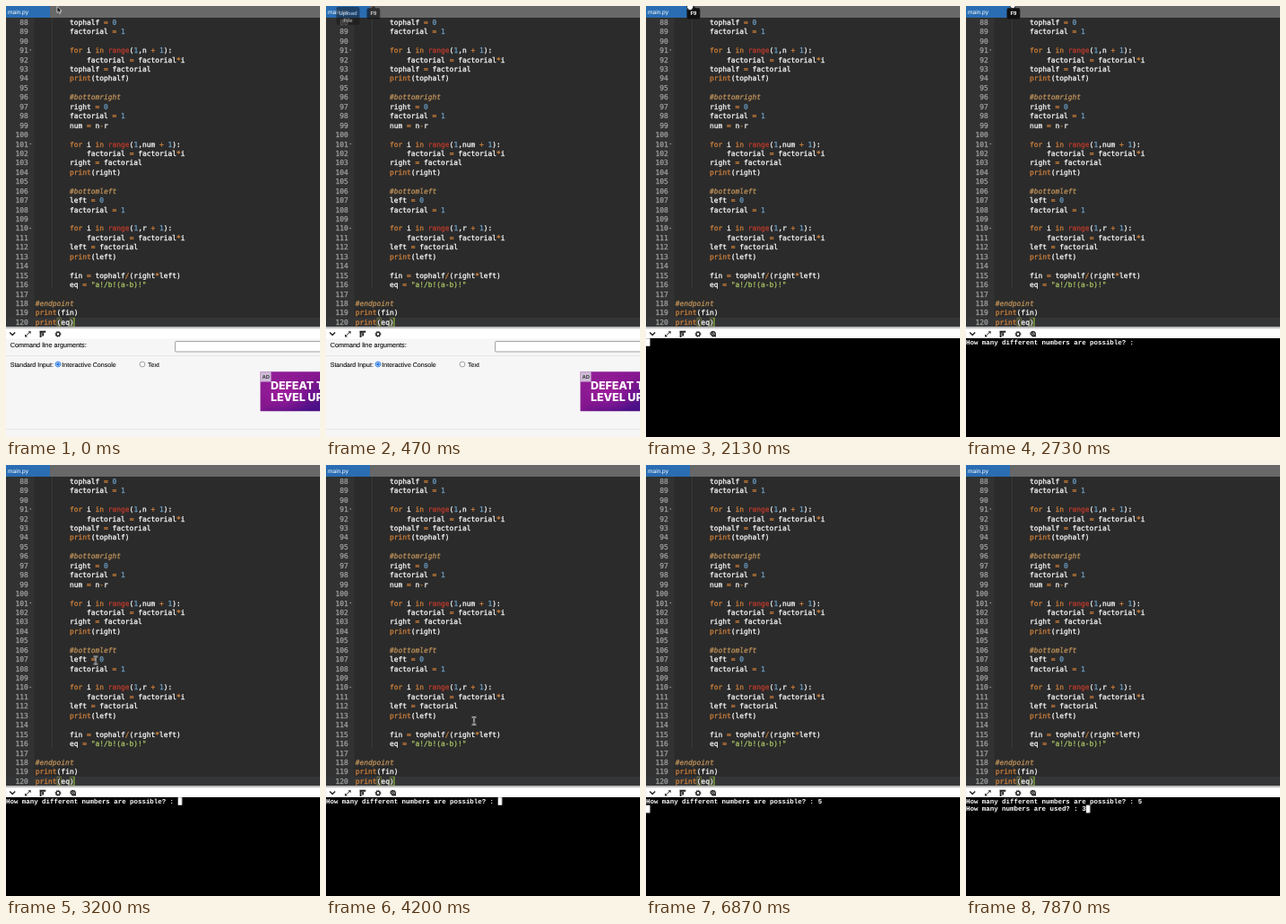
An HTML page that plays this animation: 350 by 480 pixels, repeating every 8000 ms.

```html
<!DOCTYPE html>
<html lang="en">
<head>
<meta charset="utf-8">
<title>Editor and console</title>
<style>
html, body { margin: 0; width: 100%; height: 100%; overflow: hidden; background: #2b2b2b; }
svg { display: block; width: 350px; height: 480px; text-rendering: geometricPrecision; }
.code { font: 7.92px "DejaVu Sans Mono", monospace; color: #fff; }
.code text, .code tspan { fill: currentColor; stroke: currentColor; stroke-width: .25; }
.num { color: #a2a2a2; text-anchor: end; }
.key { color: #d0803a; }
.fn { color: #bd3a2b; }
.val { color: #6c9fc6; }
.str { color: #a9c565; }
.rem { color: #c0935a; font-style: italic; }
.ui { font: 7.05px "Liberation Sans", Arial, sans-serif; }
.label { fill: #111; stroke: #111; stroke-width: .12; }
.term { font: bold 7.43px "Liberation Mono", monospace; fill: #fff; white-space: pre; }
.tip { font: bold 6px "Liberation Sans", Arial, sans-serif; fill: #fff; text-anchor: middle; }

/* one 8 s loop: 1% = 80 ms */
.a { animation: 8s linear infinite; }
.s { animation: 8s step-end infinite; }
#glow { animation-name: glow; }
#arrow { animation-name: arrow; }
#hand { animation-name: hand; }
#beam { animation-name: beam; }
#tipOpen { animation-name: tipOpen; }
#tipRun { animation-name: tipRun; }
.run { animation-name: run; }
#ask1 { animation-name: ask1; }
#ans1 { animation-name: ans1; }
#ask2 { animation-name: ask2; }
#ans2 { animation-name: ans2; }
#caret { animation-name: caret; }
#blink { animation-name: blink; }

@keyframes glow {
  0% { transform: translate(0, 0); }
  18.375%, 100% { transform: translate(16px, -4px); }
}
@keyframes arrow {
  0%, .8% { transform: translate(57px, .5px); opacity: 1; }
  2.6% { transform: translate(42px, -10px); opacity: 1; }
  2.61%, 100% { transform: translate(42px, -10px); opacity: 0; }
}
@keyframes tipOpen {
  0%, 2.5% { opacity: 0; }
  4.2%, 4.8% { opacity: .9; }
  7.2%, 100% { opacity: 0; }
}
@keyframes tipRun {
  0%, 4.2% { opacity: 0; }
  6.8%, 35.8% { opacity: 1; }
  37.8%, 100% { opacity: 0; }
}
@keyframes hand {
  0%, 26.62% { transform: translate(49px, 1px); opacity: 0; }
  26.625% { transform: translate(49px, 1px); opacity: 1; }
  33% { transform: translate(51px, -2px); opacity: 1; }
  36.6% { transform: translate(54px, 1px); opacity: 1; }
  36.61%, 100% { transform: translate(54px, 1px); opacity: 0; }
}
@keyframes beam {
  0%, 36.6% { transform: translate(56px, 8px); opacity: 0; }
  36.61% { transform: translate(56px, 8px); opacity: 1; }
  38% { transform: translate(68px, 85px); }
  40% { transform: translate(99.5px, 217px); }
  41.2% { transform: translate(137px, 264px); }
  42.5%, 45.8% { transform: translate(166.5px, 287px); }
  46.625%, 79.1% { transform: translate(165px, 285px); opacity: 1; }
  79.12%, 100% { transform: translate(165px, 285px); opacity: 0; }
}
@keyframes run { 0% { opacity: 0; } 26.625%, 100% { opacity: 1; } }
@keyframes ask1 { 0% { opacity: 0; } 33.375%, 100% { opacity: 1; } }
@keyframes ans1 { 0% { opacity: 0; } 77.5%, 100% { opacity: 1; } }
@keyframes ask2 { 0% { opacity: 0; } 86.625%, 100% { opacity: 1; } }
@keyframes ans2 { 0% { opacity: 0; } 98.375%, 100% { opacity: 1; } }
@keyframes caret {
  0% { transform: translate(0, 0); }
  33.375% { transform: translate(191.7px, 0); }
  77.5% { transform: translate(196.2px, 0); }
  85.875% { transform: translate(0, 8.6px); }
  86.625% { transform: translate(129.3px, 8.6px); }
  98.375%, 100% { transform: translate(133.8px, 8.6px); }
}
@keyframes blink {
  0% { opacity: 1; }
  30% { opacity: 0; }
  37.5% { opacity: 1; }
  45% { opacity: 0; }
  52.5% { opacity: 1; }
  60% { opacity: 0; }
  67.5% { opacity: 1; }
  75% { opacity: 0; }
  77.5% { opacity: 1; }
  93.375% { opacity: 0; }
  98.375%, 100% { opacity: 1; }
}
</style>
</head>
<body>
<svg viewBox="0 0 350 480">
  <defs>
    <linearGradient id="purple" x2=".8" y2="1">
      <stop offset="0" stop-color="#97209a"/>
      <stop offset=".55" stop-color="#84178f"/>
      <stop offset="1" stop-color="#4a1088"/>
    </linearGradient>
    <radialGradient id="shine">
      <stop offset="0" stop-color="#b823a8" stop-opacity=".5"/>
      <stop offset="1" stop-color="#b823a8" stop-opacity="0"/>
    </radialGradient>
    <clipPath id="banner"><path d="M283.500 407.300h67v44h-67z"/></clipPath>
  </defs>

  <!-- editor -->
  <rect width="350" height="358" fill="#2b2b2b"/>
  <rect y="12" width="31.500" height="346" fill="#323232"/>
  <rect y="347" width="350" height="10.500" fill="#343536"/>
  <path d="M51.500 13V315" stroke="#3d3d3d" stroke-width=".8"/>
  <g id="code" class="code"></g>
  <path d="M57 347.400h4.400v9.200h-4.400zM71.300 347.400h4.400v9.200h-4.400z" fill="none" stroke="#7c8a40" stroke-width=".7"/>
  <path d="M76 347v10" stroke="#8fd038" stroke-width=".9"/>
  <rect width="350" height="13" fill="#686868"/>
  <rect width="49" height="13" fill="#2a6db3"/>
  <text class="ui" x="2" y="8.600" fill="#fff" style="font-size:6.6px">main.py</text>

  <!-- panel -->
  <rect y="357.500" width="350" height="123" fill="#f6f6f6"/>
  <rect y="357.500" width="350" height="2" fill="#c8c8c8"/>
  <rect y="359.500" width="350" height="11" fill="#fff"/>
  <g fill="none" stroke="#222" stroke-width="1.400">
    <path d="M4.200 363.600l3 3 3-3"/>
    <path d="M21.800 367.800l5-5" stroke-width="1"/>
    <path d="M24.600 362.200h3v3zM21 365.400v3h3z" fill="#222" stroke="none"/>
    <path d="M37.500 362.700h6.800M38.600 362v7M41.200 364v3.400" stroke-width="1.900"/>
    <circle cx="58" cy="365.400" r="2"/>
    <circle cx="58" cy="365.400" r="3" stroke-width="1" stroke-dasharray="1.200 1.156"/>
  </g>
  <g class="s run" fill="#333">
    <path d="M71.600 363.200l2.400-1.400 3 .8 1 2.200v3.600l-4 .2-2.600-3z"/>
    <path d="M73 364.400l2 2M75 363.600l1.600 2.400" stroke="#fff" stroke-width=".7"/>
  </g>

  <g class="ui">
    <path d="M0 389.500h350M0 471.500h350" stroke="#e6e6e6"/>
    <rect x="188.500" y="373.500" width="170" height="11.500" rx="1" fill="#fff" stroke="#8c8c8c" stroke-width=".8"/>
    <circle cx="58" cy="399" r="2.900" fill="#fff" stroke="#1b6fe0" stroke-width=".9"/>
    <circle cx="58" cy="399" r="1.800" fill="#1b6fe0"/>
    <circle cx="152" cy="399" r="2.900" fill="#fff" stroke="#777" stroke-width=".7"/>
    <g class="label">
      <text x="4.700" y="380.300" style="font-size:7.25px">Command line arguments:</text>
      <text x="4.700" y="401.600">Standard Input:</text>
      <text x="62.300" y="401.600">Interactive Console</text>
      <text x="158" y="401.600">Text</text>
    </g>
  </g>

  <!-- banner -->
  <g clip-path="url(#banner)">
    <rect x="283" y="407" width="67" height="45" fill="url(#purple)"/>
    <ellipse id="glow" class="a" cx="312" cy="432" rx="30" ry="22" fill="url(#shine)"/>
    <g font-family="Inter, Arial, sans-serif" font-weight="800" font-size="12.400" fill="#fff">
      <text x="295" y="427.200">DEFEAT THE</text>
      <text x="295" y="440.200">LEVEL UP</text>
    </g>
    <rect x="283.500" y="407.300" width="12" height="11.200" fill="#cdbad6"/>
    <text class="ui" x="285.600" y="415.400" fill="#333" style="font-size:5.8px;font-weight:bold">AD</text>
  </g>

  <!-- console -->
  <g class="s run">
    <rect y="370" width="350" height="110"/>
    <g class="term">
      <text id="ask1" class="s" x="0" y="376.600">How many different numbers are possible? :</text>
      <text id="ans1" class="s" x="191.700" y="376.600">5</text>
      <text id="ask2" class="s" x="0" y="385.200">How many numbers are used? :</text>
      <text id="ans2" class="s" x="129.300" y="385.200">3</text>
    </g>
    <g id="caret" class="s">
      <rect id="blink" class="s" y="370.200" width="4.500" height="8.600" fill="#fff"/>
    </g>
  </g>

  <!-- tooltips -->
  <g id="tipOpen" class="a tip" opacity="0">
    <rect x="11.500" y="1" width="26" height="20" rx="2" fill="#151515"/>
    <text x="24.500" y="9.600">Upload</text>
    <text x="24.500" y="18">File</text>
  </g>
  <g id="tipRun" class="a tip" opacity="0">
    <path d="M47.500 2.200h3.200L53 0l2.300 2.200h3a2 2 0 0 1 2 2v8.200a2 2 0 0 1-2 2H47.500a2 2 0 0 1-2-2V4.200a2 2 0 0 1 2-2z" fill="#111"/>
    <text x="52.900" y="10.400">F9</text>
  </g>

  <!-- pointers -->
  <path id="arrow" class="a" d="M0 0v7l1.600-1.500 1.100 2.500 1.300-.6-1.100-2.400h2.200z" fill="#000" stroke="#fff" stroke-width=".7"/>
  <path id="hand" class="a" d="M-3.500-3v3.200q1 3.600 3.600 3.600t3.600-3.600V-3z" fill="#fff" stroke="#111" stroke-width=".8"/>
  <g id="beam" class="a" fill="none">
    <path d="M-2.400-4.400q2.400 0 2.400 1.400 0-1.400 2.400-1.400M0-3V3M-2.400 4.400Q0 4.400 0 3q0 1.400 2.400 1.400M-1.200 1.500h2.400" stroke="#eee" stroke-width="1.700"/>
    <path d="M-2.400-4.400q2.400 0 2.400 1.400 0-1.400 2.400-1.400M0-3V3M-2.400 4.400Q0 4.400 0 3q0 1.400 2.400 1.400M-1.200 1.500h2.400" stroke="#222" stroke-width=".7"/>
  </g>
</svg>
<script>
const loop = (end, name) => `
        for i in range(1,${end} + 1):
            factorial = factorial*i
        ${name} = factorial
        print(${name})
`;
const source = `        tophalf = 0
        factorial = 1
${loop("n", "tophalf")}
        #bottomright
        right = 0
        factorial = 1
        num = n-r
${loop("num", "right")}
        #bottomleft
        left = 0
        factorial = 1
${loop("r", "left")}
        fin = tophalf/(right*left)
        eq = "a!/b!(a-b)!"

#endpoint
print(fin)
print(eq)`;

const FIRST = 88, TOP = 20.8, PITCH = 10.44, LEFT = 32.8, CHAR = 4.768;
const tokens = /(#.*)|(".*?")|\b(for|in|print)\b|([=+*\/-])|\b(range)\b|\b(\d+)\b/g;
const kinds = ["rem", "str", "key", "key", "fn", "val"];

const paint = line => line.replace(tokens, (word, ...groups) => {
  const kind = kinds[groups.slice(0, 6).findIndex(g => g !== undefined)];
  return `<tspan class="${kind}">${word}</tspan>`;
});

document.getElementById("code").innerHTML = source.split("\n").map((line, i) => {
  const y = (TOP + i * PITCH).toFixed(2);
  const x = LEFT + line.search(/\S|$/) * CHAR;
  const fold = /:$/.test(line)
    ? `<path d="M26 ${y - 3.6}h2.4l-1.2 1.6z" fill="#999"/>` : "";
  return `<text class="num" x="24.7" y="${y}">${FIRST + i}</text>${fold}` +
    `<text x="${x}" y="${y}">${paint(line.trim())}</text>`;
}).join("");
</script>
</body>
</html>
```
